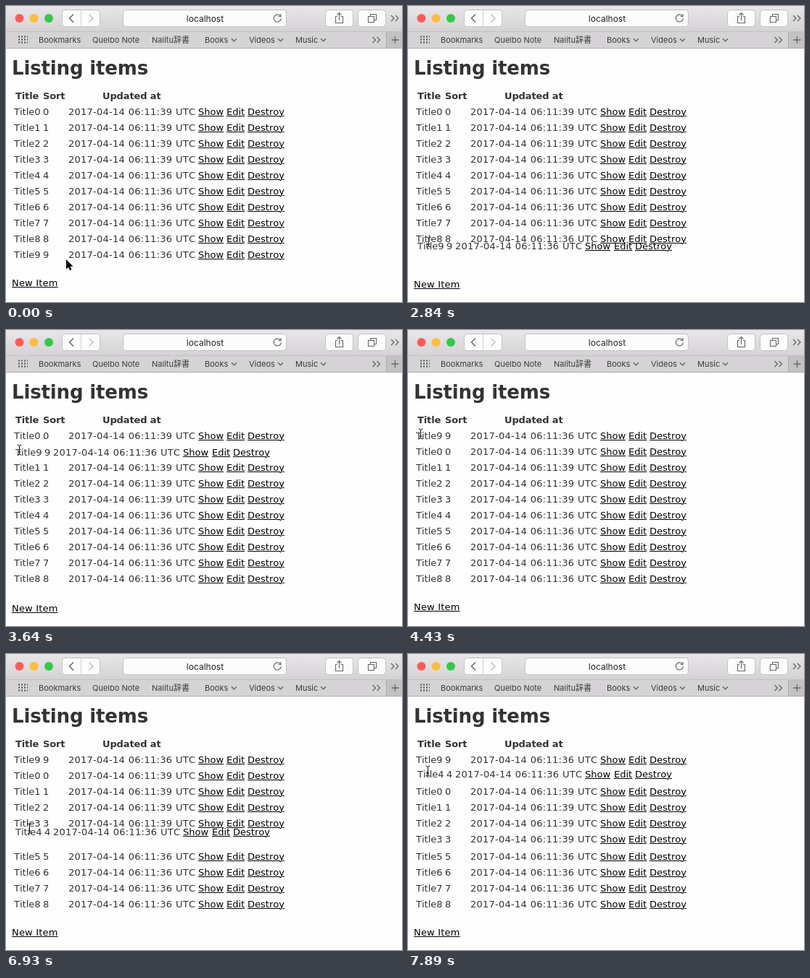
An HTML page that plays this animation: 546 by 410 pixels, repeating every 8000 ms.

```html
<!DOCTYPE html>
<html lang="en">
<head>
<meta charset="utf-8">
<title>Sortable list</title>
<style>
html, body { margin: 0; width: 100%; height: 100%; overflow: hidden; background: #fff; }
#stage { position: relative; width: 546px; height: 410px; overflow: hidden; background: #fefefe;
  font: 13px/15px "DejaVu Sans", Verdana, sans-serif; font-kerning: none; color: #333; }
#stage > *, .row span { position: absolute; white-space: pre; }
svg { left: 0; top: 0; overflow: visible; }
h1 { margin: 0; left: 8px; top: 71px; font-size: 26px; line-height: 30px; letter-spacing: -.15px; }
.head { top: 117px; font-weight: bold; letter-spacing: -.12px; }
.row { left: 0; top: 0; }
.row span { left: var(--x); top: 0; }
.row.lifted span { left: var(--lift); }
.date { letter-spacing: .25px; word-spacing: .4px; }
.link { color: #000; text-decoration: underline 1px; text-underline-offset: 1px; }
#new { left: 8px; top: 376px; letter-spacing: .2px; }
.bar { font: 11px Inter, "Noto Sans CJK JP", "Noto Sans CJK", sans-serif; fill: #3c3c3c; }
.icon { fill: none; stroke: #666; stroke-width: 1.1; }
.button { fill: #fcfcfc; stroke: #c4c2c4; }
</style>
</head>
<body>
<div id="stage">
  <svg class="bar" width="546" height="59">
    <defs>
      <linearGradient id="metal" x2="0" y2="1">
        <stop stop-color="#e8e6e8"/><stop offset="1" stop-color="#d4d2d4"/>
      </linearGradient>
      <path id="chevron" class="icon" d="M-3.5-1.7 0 1.8 3.5-1.7" style="stroke-width:1.5"/>
      <path id="more" class="icon" d="M-5.5-4-1.5 0-5.5 4M.5-4 4.5 0 .5 4" style="stroke-width:1.3"/>
    </defs>
    <rect width="546" height="36" fill="url(#metal)"/>
    <rect y="36" width="546" height="22" fill="#d5d3d5"/>
    <rect y="35" width="546" height="1" fill="#c3c1c3"/>
    <rect x="525" y="36" width="21" height="22" fill="#c3c1c3"/>
    <rect x="524" y="36" width="1" height="22" fill="#aeacae"/>
    <rect y="58" width="546" height="1" fill="#b0aeb0"/>
    <circle cx="18.5" cy="17" r="6" fill="#fc5b57"/>
    <circle cx="38.5" cy="17" r="6" fill="#fdbd3f"/>
    <circle cx="59" cy="17" r="6" fill="#34c84a"/>
    <g class="button">
      <rect x="77.5" y="5.5" width="52" height="23" rx="4"/>
      <rect x="161.5" y="5.5" width="225" height="23" rx="4"/>
      <rect x="440.5" y="5.5" width="38" height="23" rx="4"/>
      <rect x="485.5" y="5.5" width="38" height="23" rx="4"/>
    </g>
    <path d="M103.500 6V28" stroke="#d4d2d4"/>
    <g class="icon">
      <path d="M93 11.500 87.500 17 93 22.500" stroke-width="1.500"/>
      <path d="M114.500 11.500 120 17 114.500 22.500" stroke="#c0c0c0" stroke-width="1.500"/>
      <path d="M378.500 14.200A5 5 0 1 0 379.300 17M379 11V14.500H375.500"/>
      <path d="M457 14.500H454.500V23.500H464.500V14.500H462M459.500 20V10M456.500 12.500 459.500 9.500 462.500 12.500"/>
      <path d="M502.500 14.500V11.500H510.500V19.500H507.500M499.500 14.500H507.500V22.500H499.500Z"/>
      <path d="M531.500 47H541.500M536.500 42V52" stroke-width="1.300"/>
    </g>
    <path d="M17 42.500H30M17 46.500H30M17 50.500H30" stroke="#555" stroke-width="2" stroke-dasharray="2 2"/>
    <use href="#more" x="536.500" y="17"/>
    <use href="#more" x="511" y="47"/>
    <use href="#chevron" x="314.500" y="47"/>
    <use href="#chevron" x="378.500" y="47"/>
    <use href="#chevron" x="437.500" y="47"/>
    <text x="274.500" y="22" text-anchor="middle" font-size="12" fill="#222">localhost</text>
    <text x="45" y="51">Bookmarks</text>
    <text x="119" y="51">Quelbo Note</text>
    <text x="201" y="51">Nalitu辞書</text>
    <text x="274" y="51">Books</text>
    <text x="335" y="51">Videos</text>
    <text x="399" y="51">Music</text>
  </svg>
  <h1>Listing items</h1>
  <span class="head" style="left:13px">Title</span>
  <span class="head" style="left:51px">Sort</span>
  <span class="head" style="left:133px">Updated at</span>
  <span id="new" class="link">New Item</span>
  <svg id="pointer" width="1" height="1" style="z-index:2">
    <path id="arrow" d="M0 0V13.500L3.100 10.700 5.100 15.300 7.400 14.300 5.400 9.800H9.600Z" stroke="#fff" stroke-width="1.200" paint-order="stroke"/>
    <g id="beam" fill="none">
      <path d="M0-6V6" stroke="#fff" stroke-width="2.500" opacity=".6"/>
      <path d="M-3-7Q0-7 0-5Q0-7 3-7M0-5.500V5.500M-3 7Q0 7 0 5Q0 7 3 7M-1.800 3H1.800" stroke="#111"/>
    </g>
  </svg>
</div>
<script>
const LOOP = 8000, PITCH = 22, FIRST = 146;
const $ = id => document.getElementById(id);

// Pointer moves: start, end, steps, then points [x, y, y of the dragged row]
const start = [83, 351, 0];
const moves = [
  [170, 440, 4, [46, 371, 0]],
  [610, 870, 4, [20, 361, 0]],
  [1050, 1320, 4, [29.5, 343, 347]],
  [2840, 3640, 10, [24.5, 265, 272], [18.5, 166, 169]],
  [3720, 4160, 6, [17.5, 144, 147]],
  [4960, 5760, 10, [22, 175, 0], [34, 235, 0], [39, 256, 0], [33, 249, 0]],
  [5850, 5850, 1, [32.5, 254, 258]],
  [6930, 7720, 10, [30.5, 192, 199], [28, 165, 169]],
  [7800, 7890, 2, [27.5, 162, 166]]
];
const before = [0, 1, 2, 3, 4, 5, 6, 7, 8, 9];
const after = [9, ...before.slice(0, 9)];
const drags = [
  { from: 2840, to: 4430, order: before, item: 9 },
  { from: 6930, to: LOOP, order: after, item: 4 }
];

function makeRow(n) {
  const row = document.createElement('div');
  row.className = 'row';
  const cell = (text, x, lift, type = '') => {
    const span = document.createElement('span');
    span.textContent = text;
    span.className = type;
    span.style.cssText = `--x:${x}px;--lift:${lift}px`;
    row.append(span);
  };
  cell('Title' + n, 11, 13);
  cell(n, 51, 53);
  cell(`2017-04-14 06:11:${n < 4 ? 39 : 36} UTC`, 86, 65, 'date');
  cell('Show', 265, 244, 'link');
  cell('Edit', 304, 284, 'link');
  cell('Destroy', 333, 313, 'link');
  $('stage').append(row);
  return row;
}
const rows = before.map(makeRow);

function place(n, y, lifted = false) {
  rows[n].style.transform = `translateY(${Math.round(y) - 7}px)`;
  rows[n].classList.toggle('lifted', lifted);
}

function pointerAt(t) {
  let pos = start;
  for (const [from, to, steps, ...points] of moves) {
    if (t < from) break;
    const gap = (to - from) / (steps - 1) || 1;
    const step = Math.min(steps, Math.floor((t - from) / gap + .15) + 1);
    const path = [pos, ...points];
    const p = step / steps * points.length;
    const i = Math.min(points.length - 1, Math.floor(p));
    pos = path[i].map((v, k) => v + (path[i + 1][k] - v) * (p - i));
  }
  return pos;
}

function draw(t) {
  const [x, y, liftY] = pointerAt(t);
  const overText = x < 50 && y < 354;
  $('arrow').style.display = overText ? 'none' : '';
  $('beam').style.display = overText ? '' : 'none';
  const snap = overText ? Math.floor(x) + .5 : Math.round(x);
  $('pointer').style.transform = `translate(${snap}px,${Math.round(y)}px)`;

  const drag = drags.find(d => t >= d.from && t < d.to);
  $('new').style.transform = `translateY(${drag ? 2 : 0}px)`;
  if (!drag) {
    (t < drags[0].to ? before : after).forEach((n, i) => place(n, FIRST + i * PITCH));
    return;
  }
  // The lifted row leaves a gap, and 2px of extra spacing where it came from
  const origin = drag.order.indexOf(drag.item);
  const hole = Math.max(0, Math.ceil((y - FIRST) / PITCH));
  drag.order.filter(n => n !== drag.item).forEach((n, i) =>
    place(n, FIRST + (i + (i >= hole)) * PITCH + (i >= origin ? 2 : 0)));
  place(drag.item, liftY, true);
}

const began = performance.now();
function tick() {
  draw((performance.now() - began) % LOOP);
  requestAnimationFrame(tick);
}
tick();
</script>
</body>
</html>
```
